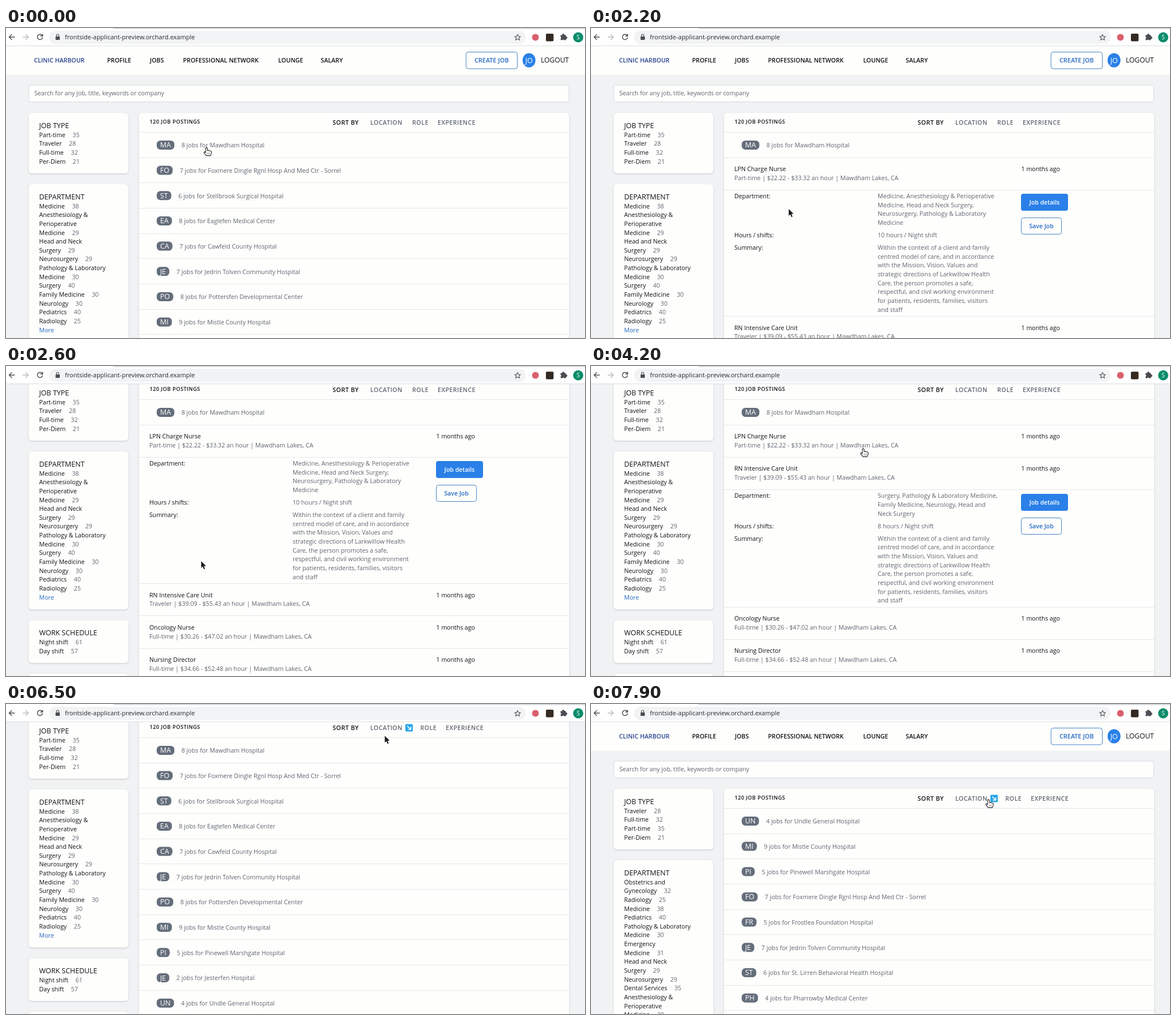
Write an HTML page with a canvas that moves like this. It is 1022 px wide and 548 px high and loops after 8000 ms.

```html
<!DOCTYPE html>
<html lang="en">
<head>
<meta charset="utf-8">
<title>Job board</title>
<style>
  html, body { margin: 0; width: 100%; height: 100%; overflow: hidden; background: #f0f2f4; }
  canvas { display: block; width: 1022px; height: 548px; }
</style>
</head>
<body>
<canvas id="stage" width="1022" height="548"></canvas>
<script>
const ctx = document.getElementById('stage').getContext('2d');
const LOOP = 8000, STEP = 100, LINE = 15.65, ROW = 44.68, JOB = 57.15;
const WHITE = '#fefefc', INK = '#0f1114', GREY = '#5e6571', BLUE = '#2a80e8', LINK = '#2468c4', RULE = '#e4e7eb';
const BODY = 10.7;

// --- content ---
const HOSPITALS = {
  mawdham: 'MA8 jobs for Mawdham Hospital',
  foxmere: 'FO7 jobs for Foxmere Dingle Rgnl Hosp And Med Ctr - Sorrel',
  stellbrook: 'ST6 jobs for Stellbrook Surgical Hospital',
  eaglefen: 'EA8 jobs for Eaglefen Medical Center',
  cawfeld: 'CA7 jobs for Cawfeld County Hospital',
  jedrin: 'JE7 jobs for Jedrin Tolven Community Hospital',
  pottersfen: 'PO8 jobs for Pottersfen Developmental Center',
  mistle: 'MI9 jobs for Mistle County Hospital',
  pinewell: 'PI5 jobs for Pinewell Marshgate Hospital',
  jesterfen: 'JE2 jobs for Jesterfen Hospital',
  undle: 'UN4 jobs for Undle General Hospital',
  frostlea: 'FR5 jobs for Frostlea Foundation Hospital',
  lirren: 'ST6 jobs for St. Lirren Behavioral Health Hospital',
  pharrowby: 'PH4 jobs for Pharrowby Medical Center'
};
const BY_DEFAULT = 'mawdham foxmere stellbrook eaglefen cawfeld jedrin pottersfen mistle pinewell jesterfen undle frostlea'.split(' ');
const BY_PLACE = 'undle mistle pinewell foxmere frostlea jedrin lirren pharrowby cawfeld'.split(' ');

const TYPES = ['Part-time|35', 'Traveler|28', 'Full-time|32', 'Per-Diem|21'];
const TYPES_SORTED = [TYPES[1], TYPES[2], TYPES[0], TYPES[3]];
const DEPTS = ['Medicine|38', 'Anesthesiology &', 'Perioperative', 'Medicine|29', 'Head and Neck', 'Surgery|29',
  'Neurosurgery|29', 'Pathology & Laboratory', 'Medicine|30', 'Surgery|40', 'Family Medicine|30', 'Neurology|30',
  'Pediatrics|40', 'Radiology|25', 'More'];
const DEPTS_SORTED = ['Obstetrics and', 'Gynecology|32', 'Radiology|25', 'Medicine|38', 'Pediatrics|40',
  'Pathology & Laboratory', 'Medicine|30', 'Emergency', 'Medicine|31', 'Head and Neck', 'Surgery|29',
  'Neurosurgery|29', 'Dental Services|35', 'Anesthesiology &', 'Perioperative', 'Medicine|29', 'More'];

const SUMMARY = ['Within the context of a client and family', 'centred model of care, and in accordance',
  'with the Mission, Vision, Values and', 'strategic directions of Larkwillow Health', 'Care, the person promotes a safe,',
  'respectful, and civil working environment', 'for patients, residents, families, visitors', 'and staff'];
const JOBS = [
  { title: 'LPN Charge Nurse', meta: 'Part-time | $22.22 - $33.32', hours: '10 hours / Night shift',
    depts: ['Medicine, Anesthesiology & Perioperative', 'Medicine, Head and Neck Surgery,',
      'Neurosurgery, Pathology & Laboratory', 'Medicine'] },
  { title: 'RN Intensive Care Unit', meta: 'Traveler | $39.09 - $55.43', hours: '8 hours / Night shift',
    depts: ['Surgery, Pathology & Laboratory Medicine,', 'Family Medicine, Neurology, Head and', 'Neck Surgery'] },
  { title: 'Oncology Nurse', meta: 'Full-time | $30.26 - $47.02' },
  { title: 'Nursing Director', meta: 'Full-time | $34.66 - $52.48' },
  { title: 'Surgical Nurse', meta: 'Part-time | $28.14 - $41.50' },
  { title: 'Pediatric Nurse', meta: 'Per-Diem | $31.72 - $44.06' },
  { title: 'Clinic Nurse', meta: 'Full-time | $27.35 - $39.80' },
  { title: 'Night Supervisor', meta: 'Traveler | $36.21 - $50.12' }
];

// --- motion: [time, value...] ---
const SCROLL = [[0, 0], [2200, 0], [2300, 20], [2500, 105], [2600, 125], [6700, 125], [6900, 94], [7000, 60],
  [7100, 60], [7300, 0], [LOOP, 0]];
const POINTER = [
  [0, 354, 211, 'hand'], [1200, 354, 211, 'hand'], [1500, 330, 254, 'hand'], [1800, 330, 254, 'hand'],
  [2200, 349, 320, 'arrow'], [2600, 344.5, 345, 'arrow'], [2700, 340, 370, 'arrow'], [2800, 336, 396, 'hand'],
  [3000, 336, 396, 'hand'], [3100, 335, 411, 'arrow'], [3600, 335, 411, 'arrow'], [3800, 432, 251, 'arrow'],
  [3900, 432, 251, 'arrow'], [4200, 480.5, 145.5, 'hand'], [4400, 478, 140, 'hand'], [4700, 466, 118, 'hand'],
  [4900, 466, 118, 'hand'], [5300, 374.5, 74.5, 'hand'], [5500, 374.5, 74.5, 'hand'], [5800, 460, 87, 'hand'],
  [6200, 672, 37, 'hand'], [6400, 672, 37, 'hand'], [6900, 655, 133, 'arrow'], [7000, 640, 148, 'arrow'],
  [7100, 640, 148, 'arrow'], [7400, 510, 217, 'hand'], [7500, 510, 217, 'hand'],
  [7900, 701.5, 168.5, 'hand'], [LOOP, 701.5, 168.5, 'hand']
];

function sample(keys, t) {
  const i = Math.max(1, keys.findIndex(k => k[0] >= t));
  const a = keys[i - 1], b = keys[i], p = (t - a[0]) / (b[0] - a[0]);
  return b.slice(1).map((v, n) => typeof v === 'number' ? a[n + 1] + (v - a[n + 1]) * p : (p > 0 ? v : a[n + 1]));
}

// --- drawing helpers ---
// y is the middle line of the text
function text(str, x, y, { size = BODY, color = INK, weight = 400, gap = 0, align = 'left' } = {}) {
  ctx.font = `${weight} ${size}px "Open Sans", "Noto Sans", sans-serif`;
  ctx.letterSpacing = gap + 'px';
  ctx.textAlign = align;
  ctx.fillStyle = color;
  ctx.fillText(str, x, y + size * 0.36);
  return ctx.measureText(str).width;
}
function box(x, y, w, h, r, fill, line) {
  ctx.beginPath();
  ctx.roundRect(x, y, w, h, r);
  if (fill) { ctx.fillStyle = fill; ctx.fill(); }
  if (line) { ctx.strokeStyle = line; ctx.lineWidth = 1; ctx.stroke(); }
}
function card(x, y, w, h) {
  ctx.shadowColor = 'rgba(0,0,0,.18)';
  ctx.shadowBlur = 3;
  ctx.shadowOffsetY = 1;
  box(x, y, w, h, 6, WHITE);
  ctx.shadowColor = 'transparent';
}
function rule(y) {
  ctx.fillStyle = RULE;
  ctx.fillRect(234.5, Math.floor(y), 759.5, 1);
}
function disc(x, y, rx, ry, fill) {
  ctx.beginPath();
  ctx.ellipse(x, y, rx, ry, 0, 0, 7);
  ctx.fillStyle = fill;
  ctx.fill();
}
function path(d, x, y, line, width, fill) {
  const p = new Path2D(d);
  ctx.save();
  ctx.translate(x, y);
  ctx.lineJoin = ctx.lineCap = 'round';
  if (fill) { ctx.fillStyle = fill; ctx.fill(p); }
  if (line) { ctx.strokeStyle = line; ctx.lineWidth = width; ctx.stroke(p); }
  ctx.restore();
}

// --- page parts ---
function browserBar() {
  ctx.fillStyle = '#fff';
  ctx.fillRect(0, 0, 1022, 31);
  ctx.fillStyle = '#dadce1';
  ctx.fillRect(190, 0, 832, 2);
  ctx.fillRect(0, 31, 1022, 1);
  box(76, 5, 841, 23, 11.5, '#f1f3f4');
  const icon = '#4a4d51';
  path('M5 0H-4.5M0 -4.5L-4.5 0L0 4.5', 10, 16, icon, 1.4);
  path('M-5 0H4.5M0 -4.5L4.5 0L0 4.5', 35, 16, '#b9bcc0', 1.4);
  path('M4 -2.5A4.6 4.6 0 1 0 4.5 1M4.6 -5V-1.8H1.4', 60, 16, icon, 1.5);
  box(87.5, 15, 7.5, 6, 1, icon);
  path('M-2 0V-2A2 2 0 0 1 2 -2V0', 91.2, 15, icon, 1.2);
  text('frontside-applicant-preview.orchard.example', 104, 16.5, { size: 11, color: '#27292c' });
  path('M0 -5.3L1.5 -1.8L5.2 -1.5L2.4 1L3.3 4.7L0 2.7L-3.3 4.7L-2.4 1L-5.2 -1.5L-1.5 -1.8Z', 903, 16.7, icon, 1.1);
  disc(934.5, 16.5, 6, 6, '#d9606c');
  box(953, 10, 13.5, 13.5, 2, '#352a22');
  path('M-4.5 -2.5H-2A1.8 1.8 0 1 1 1.4 -2.5H4V0A1.8 1.8 0 1 1 4 3.4V5.5H1A1.7 1.7 0 0 0 -2 5.5H-4.5V3A1.7 1.7 0 0 0 -4.5 0Z',
    984, 15.5, icon, 1, icon);
  disc(1010, 16.5, 9, 9, '#0c8c6c');
  text('S', 1010, 16.5, { size: 10, color: '#fff', align: 'center' });
}

function navBar() {
  ctx.fillStyle = WHITE;
  ctx.fillRect(0, 31, 1022, 51.5);
  const items = [['CLINIC HARBOUR', 49.5], ['PROFILE', 178.5], ['JOBS', 254], ['PROFESSIONAL NETWORK', 312.5],
    ['LOUNGE', 480.5], ['SALARY', 555.5]];
  items.forEach(([label, x], i) => text(label, x, 57, { weight: 600, color: i ? INK : '#29418f' }));
  box(812, 42.5, 90.5, 29.5, 4, WHITE, '#4484c8');
  text('CREATE JOB', 857.2, 57, { size: 10.9, weight: 600, color: LINK, align: 'center' });
  disc(923.2, 57, 11.4, 12.6, BLUE);
  text('JO', 923.2, 57, { size: 12.5, color: '#fff', align: 'center' });
  text('LOGOUT', 944, 57, { size: 12.2, weight: 500 });
}

function facet(title, lines, y, h) {
  card(40, y, 176, h);
  text(title, 58.5, y + 22, { size: 12.5 });
  lines.forEach((entry, i) => {
    const [label, count] = entry.split('|'), ly = y + 38.7 + i * LINE;
    const w = text(label, 58.5, ly, { color: label === 'More' ? LINK : INK });
    if (count) text(count, 58.5 + w + 12.7, ly, { color: GREY });
  });
}

function hospital(entry, y) {
  const mid = y + 22.4, label = entry.slice(0, 2);
  ctx.font = '400 12.5px "Open Sans", "Noto Sans", sans-serif';
  ctx.letterSpacing = '0px';
  const w = ctx.measureText(label).width + 12;
  box(266, mid - 8, w, 16, 6.5, '#656e7b');
  text(label, 272, mid, { size: 12.5, color: '#fff' });
  text(entry.slice(2), 266 + w + 12.5, mid + 0.4, { color: GREY });
  rule(y + ROW);
  return y + ROW;
}

function details(job, y) {
  let ly = y + 11;
  const block = (label, lines) => {
    text(label, 253, ly);
    lines.forEach((s, i) => text(s, 506, ly + i * LINE, { color: GREY }));
    ly += (lines.length - 1) * LINE + 22;
  };
  block('Department:', job.depts);
  block('Hours / shifts:', [job.hours]);
  block('Summary:', SUMMARY);
  const top = Math.round(y + 7.1);
  box(759, top, 83, 30, 4, BLUE);
  text('Job details', 800.5, top + 15, { weight: 600, color: '#fff', align: 'center' });
  box(759.5, top + 42.5, 71, 29, 4, WHITE, '#4484c8');
  text('Save Job', 795, top + 57, { weight: 600, color: LINK, align: 'center' });
  rule(ly - 10);
  return ly - 10;
}

function jobList(y, open) {
  JOBS.forEach((job, i) => {
    text(job.title, 253, y + 20);
    text(job.meta + ' an hour | Mawdham Lakes, CA', 253, y + 35.7, { color: GREY });
    text('1 months ago', 759.5, y + 20);
    y += JOB;
    rule(y);
    if (i === open) y = details(job, y);
  });
  return y;
}

function panel(s) {
  card(234.5, 150, 759.5, 1200);
  text('120 JOB POSTINGS', 253.5, 165.6, { size: 9.2, weight: 600, gap: 0.5 });
  const shift = s.marked ? 14.3 : 0;
  const head = (label, x, color = GREY) => text(label, x, 167, { weight: 600, gap: 0.45, color });
  head('SORT BY', 576.5, INK);
  head('LOCATION', 643);
  head('ROLE', 717 + shift);
  head('EXPERIENCE', 762 + shift);
  if (s.marked) {
    box(705, 160.5, 13, 13, 1.5, '#25a5ea');
    path('M-3 -3L2.6 2.6M3 -1.5V3H-1.5', 711.5, 167, '#fff', 1.6);
  }
  rule(184.5);
  let y = 184.5;
  for (const key of s.sorted ? BY_PLACE : BY_DEFAULT) {
    y = hospital(HOSPITALS[key], y);
    if (s.expanded && key === 'mawdham') y = jobList(y, s.open);
  }
}

function pointer(x, y, kind) {
  if (kind === 'hand') {
    path('M-1.5 1.5Q0 -.7 1.5 1.5V5.4Q3 4.5 4 6Q5.5 5.2 6.3 6.6Q8.8 6.2 8.8 8.6L8.3 11.6L7 14.6H-.5L-4.5 9.6Q-4.9 7.4 -2.9 8L-1.5 9.4Z',
      x, y, '#222', 1.1, '#fff');
    path('M1.7 9.5V12M3.7 9.5V12M5.7 9.5V12', x, y, '#555', 0.6);
  } else {
    const shape = 'M0 0V12L2.8 9.5L4.8 14.3L6.8 13.4L4.8 8.8L8.5 8.5Z';
    path(shape, x, y, '#fff', 1.6);
    path(shape, x, y, null, 0, '#1c1c1c');
  }
}

function stateAt(t) {
  const open = t < 1700 ? -1 : t < 3000 ? 0 : t < 4400 ? 1 : 0;
  return { open, expanded: t >= 900 && t < 5400, marked: t >= 6300, sorted: t >= 7300 };
}

function draw(t) {
  const s = stateAt(t), [scroll] = sample(SCROLL, t);
  ctx.fillStyle = '#f0f2f4';
  ctx.fillRect(0, 0, 1022, 548);
  ctx.save();
  ctx.translate(0, -scroll);
  navBar();
  box(40.5, 101, 953, 29.5, 2, WHITE, '#d6dbe1');
  text('Search for any job, title, keywords or company', 50, 115.5, { color: GREY });
  facet('JOB TYPE', s.sorted ? TYPES_SORTED : TYPES, 150, 107);
  facet('DEPARTMENT', s.sorted ? DEPTS_SORTED : DEPTS, 276, s.sorted ? 311 : 279.5);
  if (!s.sorted) {
    facet('WORK SCHEDULE', ['Night shift|61', 'Day shift|57'], 574.5, 75.5);
    facet('EXPERIENCE', [], 669, 90);
  }
  panel(s);
  ctx.restore();
  browserBar();
  pointer(...sample(POINTER, t));
}

const start = performance.now();
function tick() {
  const t = (performance.now() - start) % LOOP;
  draw(Math.floor(t / STEP) * STEP);
  requestAnimationFrame(tick);
}
tick();
</script>
</body>
</html>
```
